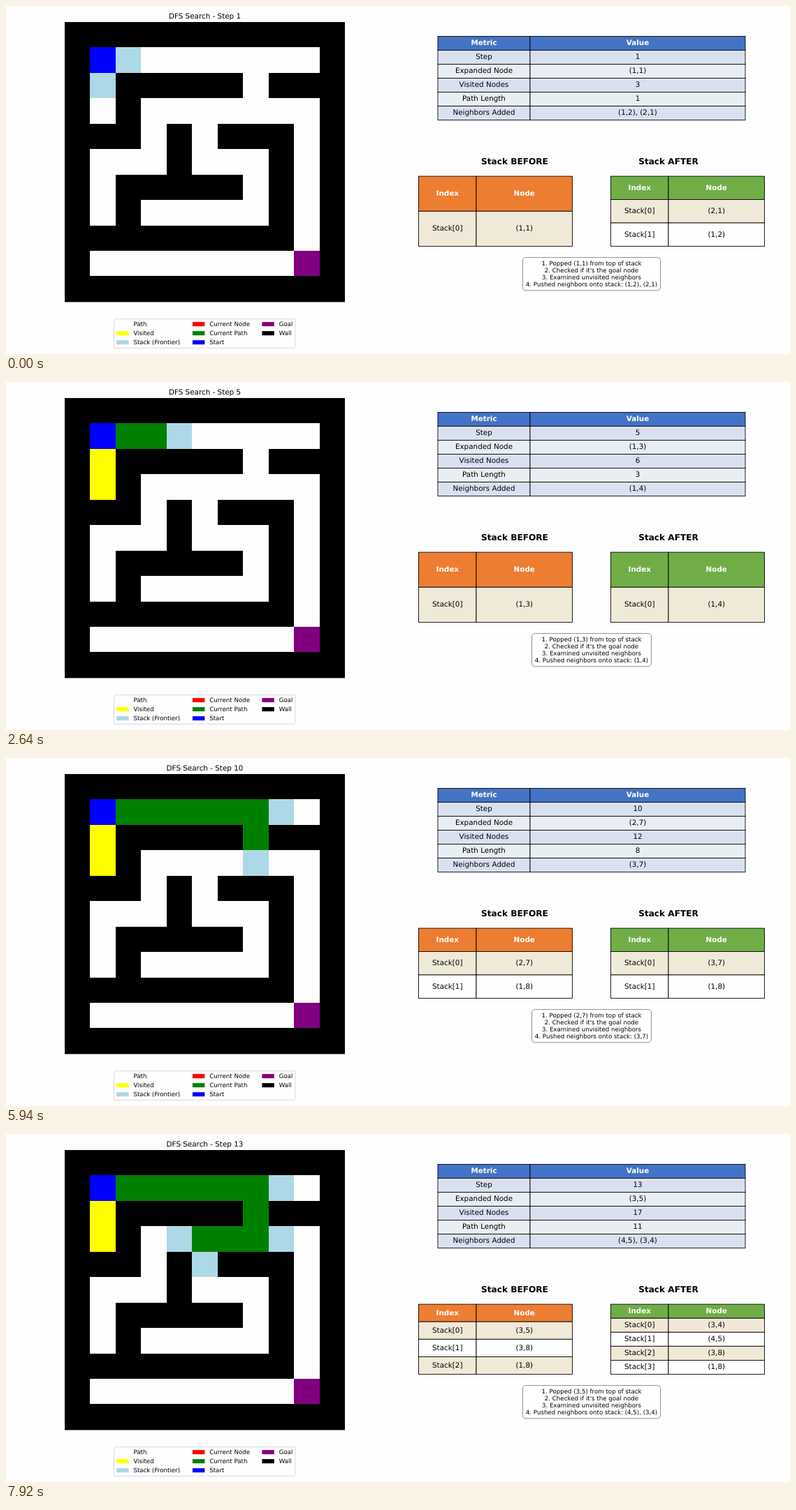
An HTML page that plays this animation: 1122x499 px, repeating every 8 s.

```html
<!DOCTYPE html>
<html lang="en">
<head>
<meta charset="utf-8">
<title>DFS Search</title>
<style>
  html, body { margin: 0; width: 100%; height: 100%; overflow: hidden; background: #fefefe; }
  svg { display: block; width: 1122px; height: 499px; }
  text { font-family: "DejaVu Sans", sans-serif; font-size: 10.39px; text-anchor: middle; text-rendering: geometricPrecision; }
  .bold { font-weight: bold; }
  .head { font-weight: bold; fill: #fff; }
  .heading { font-weight: bold; font-size: 12.12px; }
  .small { font-size: 8.66px; }
  .legend { font-size: 8.66px; text-anchor: start; }
  .cell { stroke: #000; stroke-width: .87; }
  .tile { shape-rendering: crispEdges; }
</style>
</head>
<body>
<svg viewBox="0 0 1122 499">
  <text id="title" x="284.5" y="17.9"></text>
  <rect x="84" y="23" width="401" height="401.5"/>
  <g id="maze" class="tile"></g>
  <g id="legend"></g>
  <g id="metrics"></g>
  <text class="heading" x="728" y="227.4">Stack BEFORE</text>
  <text class="heading" x="948" y="227.4">Stack AFTER</text>
  <g id="before"></g>
  <g id="after"></g>
  <rect id="noteBox" y="360.6" height="47.3" rx="4.33" fill="#fff" stroke="#808080" stroke-width=".87"/>
  <g id="notes"></g>
</svg>
<script>
const LOOP = 8000, STEP_MS = 660, STEPS = 13;
const GRID = [
  "###########",
  "#.........#",
  "#.#####.###",
  "#.#.......#",
  "###.#.###.#",
  "#...#...#.#",
  "#.#####.#.#",
  "#.#.....#.#",
  "#########.#",
  "#.........#",
  "###########"
];
const START = "1,1", GOAL = "9,9";
const DIRS = [[0, 1], [1, 0], [0, -1], [-1, 0]];
const $ = id => document.getElementById(id);
const paren = key => `(${key})`;

// Depth-first search, one snapshot per expanded node
function search() {
  const parent = { [START]: null }, stack = [START], expanded = [], steps = [];
  while (steps.length < STEPS) {
    const before = [...stack].reverse();
    const node = stack.pop();
    const [r, c] = node.split(",").map(Number);
    const added = DIRS.map(([dr, dc]) => [r + dr, c + dc])
      .filter(([y, x]) => GRID[y][x] === "." && !([y, x] in parent))
      .map(String);
    added.forEach(key => { parent[key] = node; stack.push(key); });
    expanded.push(node);
    const path = [];
    for (let key = node; key; key = parent[key]) path.push(key);
    steps.push({
      node, before, added, path,
      after: [...stack].reverse(),
      expanded: [...expanded],
      visited: Object.keys(parent).length
    });
  }
  return steps;
}

const rect = (x, y, w, h, fill, cls = "") =>
  `<rect class="${cls}" x="${x}" y="${y}" width="${w}" height="${h}" fill="${fill}"/>`;
const label = (x, y, str, cls = "") => `<text class="${cls}" x="${x}" y="${y}">${str}</text>`;

function tile(r, c, fill) {
  const x = i => Math.round(84 + 36.45 * i), y = i => Math.round(22.9 + 36.45 * i);
  return rect(x(c), y(r), x(c + 1) - x(c), y(r + 1) - y(r), fill);
}

function drawMaze(s) {
  const color = key =>
    key === START ? "#00f" :
    key === GOAL ? "#800080" :
    s.path.includes(key) ? "#008000" :
    s.after.includes(key) ? "#add8e6" :
    s.expanded.includes(key) ? "#ff0" : "#fefefe";
  let out = "";
  GRID.forEach((row, r) => [...row].forEach((ch, c) => {
    if (ch === ".") out += tile(r, c, color(`${r},${c}`));
  }));
  $("maze").innerHTML = out;
}

function table({ x, y, w, h, split, head, bands }, rows) {
  const rowH = h / rows.length, leftW = w * split;
  return rows.map((row, i) => {
    const top = y + i * rowH, base = top + rowH / 2 + 2.86;
    const fill = i ? bands[(i - 1) % 2] : head, cls = i ? "" : "head";
    return rect(x, top, leftW, rowH, fill, "cell") +
      rect(x + leftW, top, w - leftW, rowH, fill, "cell") +
      label(x + leftW / 2, base, row[0], cls) +
      label(x + (leftW + w) / 2, base, row[1], cls);
  }).join("");
}

function drawMetrics(s, n) {
  $("metrics").innerHTML = table(
    { x: 618, y: 43.4, w: 440, h: 120.1, split: .3, head: "#4472c4", bands: ["#d9e1f0", "#e9edf4"] },
    [
      ["Metric", "Value"],
      ["Step", n],
      ["Expanded Node", paren(s.node)],
      ["Visited Nodes", s.visited],
      ["Path Length", s.path.length],
      ["Neighbors Added", s.added.map(paren).join(", ") || "None (all neighbors already visited)"]
    ]);
}

// Both stacks share one band colour, mixed by the area each one shades
function bandColor(s) {
  const area = list => Math.ceil(list.length / 2) / (list.length + 1);
  const a = area(s.before), b = area(s.after), k = a / (a + b);
  const mix = (p, q) => Math.round(p * k + q * (1 - k));
  return `rgb(${mix(251, 226)},${mix(229, 239)},${mix(214, 218)})`;
}

function drawStack(id, x, head, band, list) {
  $(id).innerHTML = table(
    { x, y: 244.1, w: 220, h: 100.4, split: .375, head, bands: [band, "#fefefe"] },
    [["Index", "Node"], ...list.map((key, i) => [`Stack[${i}]`, paren(key)])]);
}

function drawNotes(s) {
  const last = s.added.length
    ? "Pushed neighbors onto stack: " + s.added.map(paren).join(", ")
    : "No new neighbors to add";
  const lines = [`Popped ${paren(s.node)} from top of stack`,
    "Checked if it's the goal node", "Examined unvisited neighbors", last];
  $("notes").innerHTML = lines
    .map((str, i) => label(838, 371.6 + 10.08 * i, `${i + 1}. ${str}`, "small")).join("");
  const widths = [...$("notes").children].map(el => el.getComputedTextLength());
  const w = Math.max(...widths) + 8.66;
  $("noteBox").setAttribute("x", 838 - w / 2);
  $("noteBox").setAttribute("width", w);
}

function drawLegend() {
  const columns = [
    [158.1, [["Path", "#fefefe"], ["Visited", "#ff0"], ["Stack (Frontier)", "#add8e6"]]],
    [266.9, [["Current Node", "#f00"], ["Current Path", "#008000"], ["Start", "#00f"]]],
    [366.4, [["Goal", "#800080"], ["Wall", "#000"]]]
  ];
  $("legend").innerHTML =
    `<rect x="154.6" y="448.7" width="259.4" height="41.8" rx="1.7" fill="#fefefe" stroke="#d6d6d6" stroke-width=".87"/>` +
    columns.map(([x, items]) => items.map(([name, fill], i) => {
      const base = 459.2 + 13.05 * i;
      return rect(x, base - 6.06, 17.5, 6.06, fill) + label(x + 24.3, base, name, "legend");
    }).join("")).join("");
}

const steps = search();
let shown = -1;

function show(i) {
  const s = steps[i], band = bandColor(s);
  $("title").textContent = `DFS Search - Step ${i + 1}`;
  drawMaze(s);
  drawMetrics(s, i + 1);
  drawStack("before", 590.5, "#ed7d31", band, s.before);
  drawStack("after", 865.5, "#70ad47", band, s.after);
  drawNotes(s);
}

const origin = performance.now();
function tick() {
  const i = Math.floor((performance.now() - origin) % LOOP / STEP_MS);
  if (i !== shown) show(shown = i);
  requestAnimationFrame(tick);
}
drawLegend();
tick();
</script>
</body>
</html>
```
